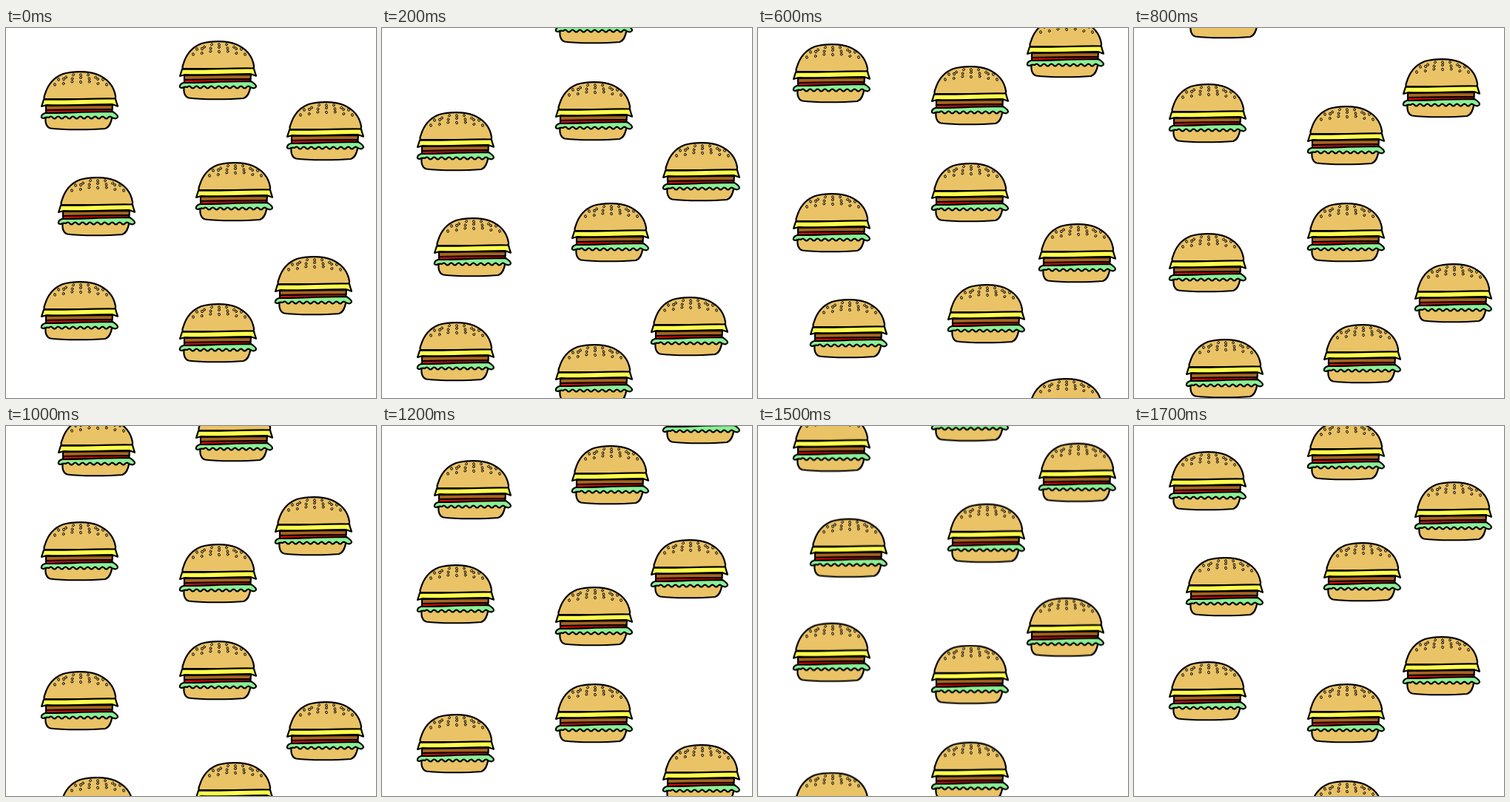
An HTML page for the animation above (1.8 s loop, 500 by 500 pixels).

```html
<!DOCTYPE html>
<html lang="en">
<head>
<meta charset="utf-8">
<title>Falling burgers</title>
<style>
  html, body { margin: 0; width: 100%; height: 100%; overflow: hidden; background: #fff; }
  svg { display: block; width: 100%; height: 100%; }
  #rain { animation: fall 1800ms infinite; }
  /* One picture every 100 ms; marks sit just before each tick. */
  @keyframes fall {
    0%     { transform: translateY(0);     animation-timing-function: steps(6); }
    33.32% { transform: translateY(165px); animation-timing-function: steps(4); }
    55.54% { transform: translateY(273px); animation-timing-function: steps(2); }
    66.65% { transform: translateY(331px); animation-timing-function: steps(5); }
    94.43% { transform: translateY(462px); animation-timing-function: steps(1); }
    100%   { transform: translateY(486px); }
  }
</style>
</head>
<body>
<svg viewBox="0 0 500 500">
  <defs>
    <g id="burger" stroke="#000" stroke-width="2.2" stroke-linejoin="round" stroke-linecap="round">
      <path fill="#eac366" d="M7 61C5 70 8 76 13 77.500C30 80 70 79.500 87 78C93 76 95 70 96.500 62Z"/>
      <path fill="#a8641f" d="M7 47L97 46L96.500 52L7 53Z"/>
      <path fill="#f00808" d="M7 53L96.500 52L96 56L7 57Z"/>
      <path id="lettuce" fill="#8af096"/>
      <path fill="#eac366" d="M5 38C4 36 4.500 34 5.500 32C9 20 17 9 30 4C44 0 64 0 77 5C91 11 99 22 101 34Q101.500 37 99 38Z"/>
      <path fill="#ffff4c" d="M4 38.500C34 39.500 66 36.800 101 37.500C101.500 41 103 44 104 47.800L97 45.200C66 45 36 47 8 46L1 48C2 45 3 42 4 38.500Z"/>
      <g id="seeds" fill="#e6c67c" stroke-width=".9"></g>
    </g>
    <g id="tile"></g>
  </defs>
  <g id="rain">
    <use href="#tile"/>
    <use href="#tile" y="-486"/>
  </g>
</svg>
<script>
  const byId = id => document.getElementById(id);
  const add = (parent, tag, attrs) => {
    const node = document.createElementNS('http://www.w3.org/2000/svg', tag);
    for (const key in attrs) node.setAttribute(key, attrs[key]);
    byId(parent).append(node);
  };

  // Even ripples run right to left along the lower edge.
  const frill = 'q-2.500-3-5 0' + 't-5 0'.repeat(16);
  byId('lettuce').setAttribute('d',
    `M6 57C30 57 66 55 97 55C100 57 104 59 104 62Q103 66 96 63${frill}Q7 62 4 64Q0 64 1 61Q2 58 6 57Z`);

  // Each row of seeds follows the curve of the bun.
  const seedRow = (count, reach, top, sag) => {
    for (let i = 0; i < count; i++) {
      const u = 2 * i / (count - 1) - 1;
      const cx = 54 + u * reach, cy = top + sag * u * u + i % 2;
      add('seeds', 'ellipse', { cx, cy, rx: 1.3, ry: 1.7, transform: `rotate(${i % 3 * 40 - 30} ${cx} ${cy})` });
    }
  };
  seedRow(7, 30, 4.5, 7);
  seedRow(5, 23, 9, 2);
  seedRow(7, 35, 14, 4.5);

  const burgers = [[47, 58], [234, 17], [379, 99], [70, 201], [256, 181], [363, 308], [47, 342], [234, 372]];
  burgers.forEach(([x, y]) => add('tile', 'use', { href: '#burger', x, y }));
</script>
</body>
</html>
```
